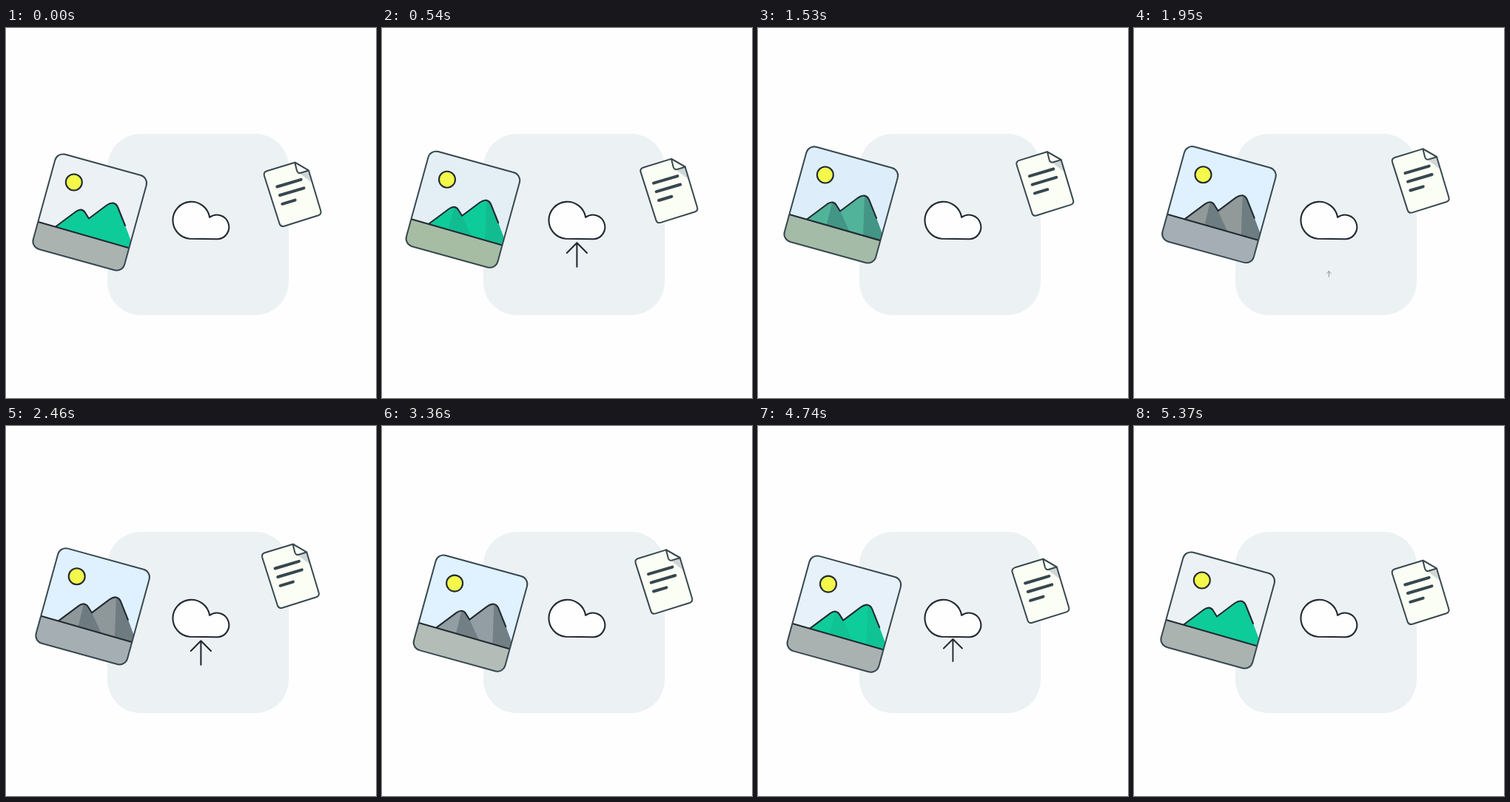
Write an HTML page that moves like this. It is 500x500 px and loops after 5.43 s.

```html
<!DOCTYPE html>
<html lang="en">
<head>
<meta charset="utf-8">
<title>Upload</title>
<style>
  html, body { margin: 0; width: 100%; height: 100%; overflow: hidden; background: #fefefe; }
  svg { display: block; width: 100%; height: 100%; }
  .ink { stroke: #222a32; stroke-width: 2.1; stroke-linecap: round; stroke-linejoin: round; }
  .slate { stroke: #37474f; stroke-width: 2; stroke-linecap: round; stroke-linejoin: round; }
  .none { fill: none; }
</style>
</head>
<body>
<svg viewBox="0 0 500 500">
  <defs>
    <clipPath id="frame">
      <rect x="49.25" y="182.5" width="128" height="133" rx="11" transform="rotate(15.4 113.25 249)"/>
    </clipPath>
    <clipPath id="hills">
      <path d="M67 268.5L94.500 248Q102.500 242.500 107 249.500L112 257.500L136 239.500Q146.500 232.500 151 242L161 267L169.500 290L167 298Z"/>
    </clipPath>
  </defs>

  <rect x="137" y="143" width="245" height="245" rx="45" fill="#ecf1f4"/>

  <g id="arrow" class="ink none">
    <path d="M263.400 322.800V290.300M249.800 303.900L263.400 290.300L277 303.900"/>
  </g>
  <path class="ink" fill="#fefefe" d="M248 284.700A25 25 0 1 1 275.100 255.800A16.400 16.400 0 1 1 286 285.300Z"/>

  <g id="picture">
    <g clip-path="url(#frame)">
      <rect id="sky" x="20" y="150" width="190" height="190"/>
      <g clip-path="url(#hills)">
        <rect id="hill" x="60" y="230" width="115" height="75"/>
        <path id="shade" d="M101.500 244L93.500 277L125.500 287L112 257.500L106 244ZM145 234L143 292L168 299L171 290L152 234Z"/>
      </g>
      <path id="ground" d="M30 258L180 301.200V345H30Z"/>
      <path class="ink none" d="M67 268.500L94.500 248Q102.500 242.500 107 249.500L112 257.500L136 239.500Q146.500 232.500 151 242L161 267M43.500 262L167 297.400"/>
    </g>
    <circle class="ink" cx="91.800" cy="208.500" r="11" fill="#f3f84a"/>
    <rect class="slate none" x="49.25" y="182.5" width="128" height="133" rx="11" transform="rotate(15.4 113.25 249)"/>
  </g>

  <g id="paper">
    <path fill="#fbfef4" d="M352.500 193.300L390.300 181.700L409 192.500L425.300 247Q426.700 251.700 422 253.300L376 267.700Q371.300 269.200 369.700 264.700L349 199.700Q347.500 195 352.500 193.300Z"/>
    <path fill="#d0d6d6" d="M397 196.500L409 192.500L414 209.500Z"/>
    <path class="slate none" d="M352.500 193.300L390.300 181.700L409 192.500L425.300 247Q426.700 251.700 422 253.300L376 267.700Q371.300 269.200 369.700 264.700L349 199.700Q347.500 195 352.500 193.300Z"/>
    <path class="slate" fill="#fbfef4" d="M390.300 181.700L393 192.500Q394.300 197 398.500 195.700L409 192.500Z"/>
    <path class="slate none" style="stroke-width:4" d="M366.300 214.500L398.700 204.900M370 226L402.500 216.300M373.300 237.800L390.700 232.600"/>
  </g>
</svg>

<script>
const LOOP = 5430, END = 5370, STEP = 30, CYCLE = END / 3;
const $ = id => document.getElementById(id);

// [time, dx, dy]; both paths are closed
const picturePath = [
  [0, 0, 0], [590, -4, -4.1], [1110, -3, -7.8], [1740, .2, -10.8], [1950, 1.7, -10.3],
  [2460, 3.9, -5.2], [2850, 5.1, -1], [3360, 6.3, 4.1], [4050, 6.1, 8.6],
  [4250, 5.4, 9], [4590, 3.9, 6.3], [5160, .9, 1.7], [END, 0, 0]
];
const paperPath = [
  [0, 0, 0], [600, .7, -5.4], [1110, .7, -10.3], [1950, .1, -18.3], [2460, -2.7, -22],
  [2880, -4.6, -20], [3360, -6.3, -14.3], [4050, -7.3, -6.3], [4560, -6.4, -2.8],
  [5130, -2, -.6], [END, 0, 0]
];

const colorTimes = [0, 1110, 1950, 2460, 3360, 4050, END];
const colors = {
  sky: ['#ecf1f5', '#daeaf5', '#dff1ff', '#dff0ff', '#e0f1ff', '#e0f1ff', '#ecf1f5'],
  hill: ['#0ecb9a', '#0fcb9b', '#929a99', '#8e989a', '#929ea3', '#10d09c', '#0ecb9a'],
  shade: ['#0ecb9a', '#17ac88', '#6e7d82', '#6e7b80', '#728085', '#12ba8e', '#0ecb9a'],
  ground: ['#aab3b0', '#a2c898', '#a5aeb5', '#a5aeb3', '#b3bcb7', '#a9b1b3', '#aab3b0']
};

const clamp = v => Math.min(1, Math.max(0, v));
const ease = v => .5 - .5 * Math.cos(Math.PI * clamp(v));

function segment(times, t) {
  let i = 0;
  while (i < times.length - 2 && t >= times[i + 1]) i++;
  return i;
}

// Smooth closed curve through the keys
function along(path, t) {
  const n = path.length - 1;
  const i = segment(path.map(k => k[0]), t);
  const key = j => {
    const lap = Math.floor(j / n), k = path[j - lap * n];
    return [k[0] + lap * END, k[1], k[2]];
  };
  const [p, a, b, q] = [key(i - 1), key(i), key(i + 1), key(i + 2)];
  const span = b[0] - a[0], u = (t - a[0]) / span;
  return [1, 2].map(c => {
    const ma = (b[c] - p[c]) / (b[0] - p[0]) * span;
    const mb = (q[c] - a[c]) / (q[0] - a[0]) * span;
    const d = b[c] - a[c];
    return a[c] + u * (ma + u * (3 * d - 2 * ma - mb + u * (ma + mb - 2 * d)));
  });
}

const rgb = hex => [1, 3, 5].map(i => parseInt(hex.slice(i, i + 2), 16));

function colorAt(list, t) {
  const i = segment(colorTimes, t);
  const u = (t - colorTimes[i]) / (colorTimes[i + 1] - colorTimes[i]);
  const to = rgb(list[i + 1]);
  return `rgb(${rgb(list[i]).map((v, c) => Math.round(v + (to[c] - v) * u))})`;
}

function move(id, path, t) {
  $(id).setAttribute('transform', `translate(${along(path, t)})`);
}

// The arrow grows from a point below, then shrinks up into the cloud
function drawArrow(t) {
  const phase = t % CYCLE, leaving = phase > 1070;
  const size = leaving ? 1 - ease((phase - 1070) / 500) : ease(phase / 510);
  const x = 263.4, y = leaving ? 260 : 340;
  $('arrow').setAttribute('transform',
    `translate(${x} ${y}) scale(${size}) translate(${-x} ${-y})`);
  $('arrow').style.display = size > .001 ? '' : 'none';
}

function draw() {
  const t = Math.min(END, Math.floor(performance.now() % LOOP / STEP) * STEP);
  move('picture', picturePath, t);
  move('paper', paperPath, t);
  for (const id in colors) $(id).setAttribute('fill', colorAt(colors[id], t));
  drawArrow(t);
  requestAnimationFrame(draw);
}
draw();
</script>
</body>
</html>
```
